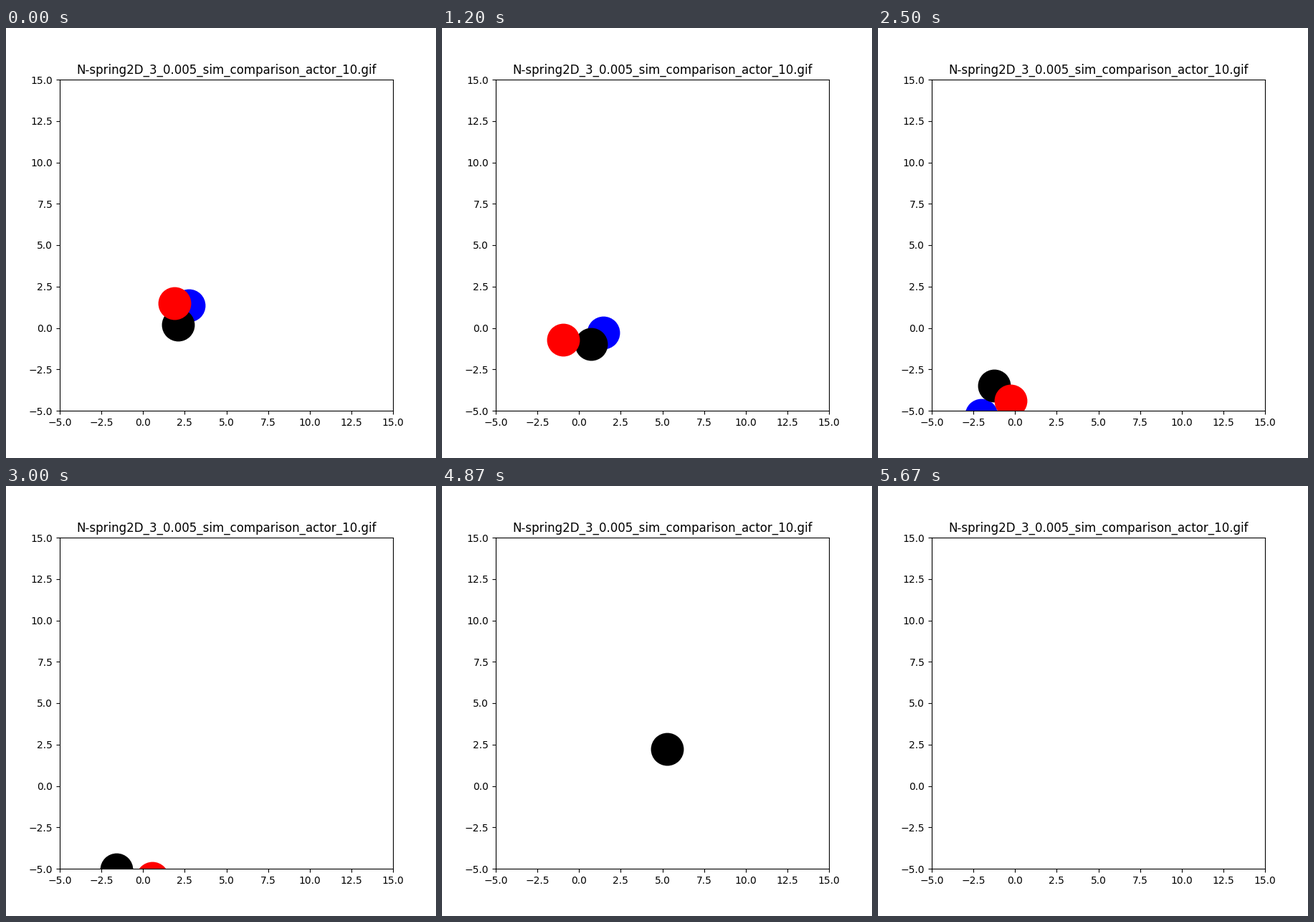
Animation of 600x600 px, one loop 7.39 s. Source, as a matplotlib script:

```python
import numpy as np
import matplotlib.pyplot as plt
from matplotlib.animation import FuncAnimation
from matplotlib.transforms import IdentityTransform

SIZE = 600        # stage, px
LOOP = 7390       # ms
TICK = 10         # ms per frame
STEP = 100        # ms per simulation step


class Flight:
    """A polynomial arc through evenly spaced key points, in stage pixels."""

    def __init__(self, start, steps, gap, *points):
        self.start, self.steps, self.gap = start, steps, gap
        self.curve = np.polyfit(range(len(points)), points, len(points) - 1)

    def at(self, ms):
        step = (ms - self.start) // STEP
        if not 0 <= step <= self.steps:
            return None
        x, y = (np.polyval(c, step / self.gap) for c in self.curve.T)
        return x, SIZE - y


# Listed from back to front.
FLIGHTS = {
    "blue": [Flight(0, 26, 8, (255, 387), (244, 404), (201.5, 454), (150, 529))],
    "black": [
        Flight(0, 33, 8, (240, 414), (222, 434), (193, 452), (165, 492),
               (154.5, 549)),
        Flight(4070, 15, 5, (301, 552), (307, 450), (318, 298), (312.5, 67)),
    ],
    "red": [Flight(0, 32, 8, (235, 384), (184, 413), (164, 460.5), (181, 514),
                   (210, 555.5))],
}

fig, ax = plt.subplots(figsize=(SIZE / 100, SIZE / 100), dpi=100)
ax.set(xlim=(-5, 15), ylim=(-5, 15))
ax.set_xticks(np.arange(-5, 15.1, 2.5))
ax.set_yticks(np.arange(-5, 15.1, 2.5))
ax.set_title("N-spring2D_3_0.005_sim_comparison_actor_10.gif")

# Render the static labels once and reuse them as a backdrop;
# the frame lines stay live so that they lie over the balls.
ax.spines[:].set_visible(False)
fig.canvas.draw()
backdrop = np.asarray(fig.canvas.buffer_rgba()).copy()
fig.figimage(backdrop, zorder=-1)
for part in (ax.xaxis, ax.yaxis, ax.title, ax.patch):
    part.set_visible(False)
ax.spines[:].set_visible(True)

balls = {color: ax.plot([], [], "o", color=color, ms=32,
                        transform=IdentityTransform())[0]
         for color in FLIGHTS}


def update(frame):
    for color, ball in balls.items():
        spots = [flight.at(frame * TICK) for flight in FLIGHTS[color]]
        shown = [spot for spot in spots if spot]
        ball.set_data([x for x, _ in shown], [y for _, y in shown])
    return list(balls.values())


anim = FuncAnimation(fig, update, frames=LOOP // TICK, interval=TICK,
                     repeat=True, repeat_delay=0)
plt.show()
```
